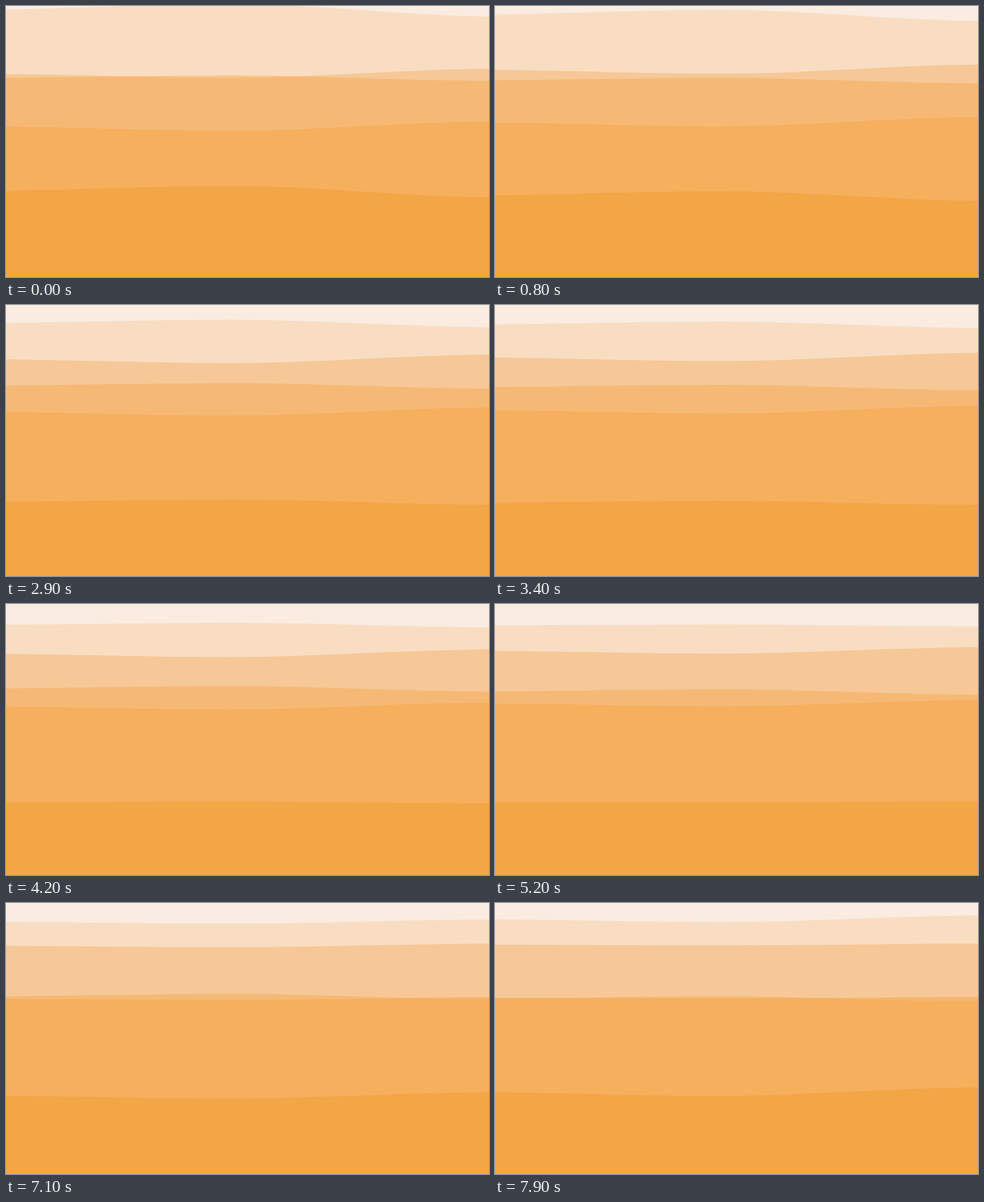
These frames come from a looping animation (640 px wide and 360 px high, 8 s). An HTML page with a canvas:

```html
<!DOCTYPE html>
<html lang="en">
<head>
<meta charset="utf-8">
<title>Dune waves</title>
<style>
  html, body { margin: 0; width: 100%; height: 100%; overflow: hidden; background: #faece1; }
  canvas { display: block; width: 100vw; height: 100vh; }
</style>
</head>
<body>
<canvas id="stage" width="640" height="360"></canvas>
<script>
const LOOP = 8000, STEP = 100, WIDTH = 640, HEIGHT = 360, CREST = 297;
const RIGHT_DROP = 1.35; // fall of the right end, relative to the rise of the crest

// level: height of the left end; swell: rise of the crest above it.
// Both are given at the start, middle and end of the loop.
const WAVES = [
  { color: '#f4a446', alpha: 0.2,  level: [4.5, 27.2, 21],       swell: [7, 2.8, -4] },
  { color: '#ef9f48', alpha: 0.35, level: [90.2, 67, 55],        swell: [-5.1, -4.4, -1] },
  { color: '#f4a446', alpha: 0.42, level: [95.3, 111.4, 127.5],  swell: [3.1, 3.1, 3.1] },
  { color: '#f4a446', alpha: 0.53, level: [160.3, 137, 125.8],   swell: [-5.3, -4.1, -0.8] },
  { color: '#f2a646', alpha: 1,    level: [245.5, 263.3, 250.7], swell: [6.5, 1.4, -5] }
];

const ctx = document.getElementById('stage').getContext('2d');

// Parabola through three evenly spaced values, s from 0 to 1.
function arc([start, middle, end], s) {
  return start * (1 - 2 * s) * (1 - s) + middle * 4 * s * (1 - s) - end * s * (1 - 2 * s);
}

function drawWave({ color, alpha, level, swell }, s) {
  const left = arc(level, s), rise = arc(swell, s);
  const crest = left - rise, right = left + rise * RIGHT_DROP;
  const third = (WIDTH - CREST) / 3;
  ctx.beginPath();
  ctx.moveTo(0, left);
  ctx.bezierCurveTo(CREST / 3, left - rise * 0.2, CREST * 2 / 3, crest, CREST, crest);
  ctx.bezierCurveTo(CREST + third, crest, WIDTH - third, right - rise * 0.2, WIDTH, right);
  ctx.lineTo(WIDTH, HEIGHT);
  ctx.lineTo(0, HEIGHT);
  ctx.closePath();
  ctx.globalAlpha = alpha;
  ctx.fillStyle = color;
  ctx.fill();
}

function render() {
  const time = Math.floor((performance.now() % LOOP) / STEP) * STEP;
  ctx.clearRect(0, 0, WIDTH, HEIGHT);
  for (const wave of WAVES) drawWave(wave, time / LOOP);
  requestAnimationFrame(render);
}
render();
</script>
</body>
</html>
```
